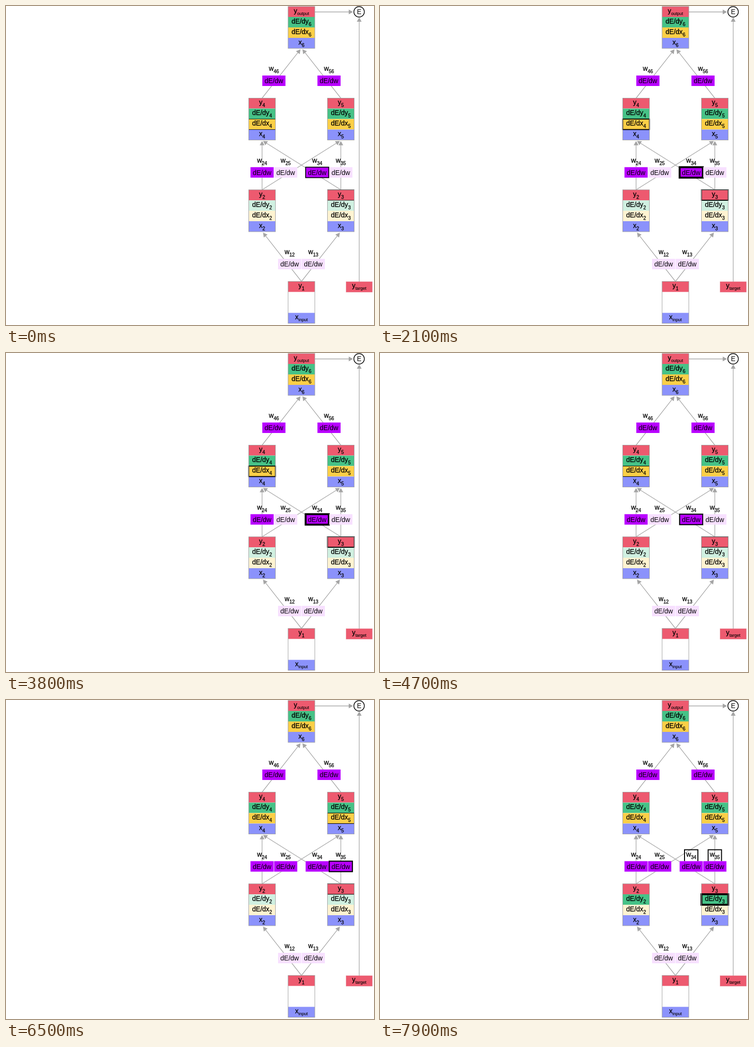
These frames come from a looping animation (771x670 px, 8 s). An HTML page:

```html
<!DOCTYPE html>
<html lang="en">
<head>
<meta charset="utf-8">
<title>Backpropagation</title>
<style>
  html, body { margin: 0; width: 100%; height: 100%; overflow: hidden; background: #fff; }
  svg { display: block; }
  text { font: 14px "Liberation Sans", Arial, sans-serif; text-anchor: middle; fill: #000; }
  .bold { stroke: #000; stroke-width: .3px; }
  .digit { font-size: 10px; }
  .word { font-size: 9px; stroke-width: .1px; }
  .edge { stroke: #a5a5a5; stroke-width: 1.3; }
  .head { fill: #a5a5a5; }
  .frame { fill: none; stroke: #a0a0a0; }
  .mark { fill: none; stroke: #000; stroke-width: 0; }
</style>
</head>
<body>
<svg id="stage" width="771" height="670" viewBox="0 0 771 670"></svg>
<script>
const LOOP = 8000, STEP = 100, RAMP = 180, FILL = 300;
const ROW = 22, NODE_W = 56, WEIGHT_W = 48.5;
const RED = '#ed5a6f', PURPLE = '#b800ff';
const ROWS = [
  { key: 'y', text: 'y', fill: RED, size: 2 },
  { key: 'dy', text: 'dE/dy', fill: '#46c287', size: 4 },
  { key: 'dx', text: 'dE/dx', fill: '#fbcf47', size: 2 },
  { key: 'x', text: 'x', fill: '#8b92fb', size: 2 }
];
const EDGES = ['12', '13', '24', '25', '34', '35', '46', '56'];
const KNOWN = ['24', '34', '46', '56'];

// Each phase outlines its parts in equal beats and fills one of them in
const phases = [
  { from: -80, to: 4800, beats: 6, parts: 'dx4 dw34 y3' },
  { from: 4880, to: 5690, beats: 1, parts: 'y2 dw25', fills: 'dw25' },
  { from: 4880, to: 6600, beats: 1, parts: 'dx5' },
  { from: 5800, to: 6600, beats: 1, parts: 'y3 dw35', fills: 'dw35' },
  { from: 6600, to: 7620, beats: 2, parts: 'dy2 w24 w25 dx4 dx5', fills: 'dy2' },
  { from: 7500, to: 8080, beats: 1, parts: 'dy3 w34 w35', fills: 'dy3' }
];

const stage = document.getElementById('stage');
const marks = [], fades = [];
const clamp = v => Math.max(0, Math.min(1, v));

function add(tag, attrs, parent = stage) {
  const el = document.createElementNS('http://www.w3.org/2000/svg', tag);
  for (const key in attrs) el.setAttribute(key, attrs[key]);
  parent.appendChild(el);
  return el;
}

function rect(x, y, width, height, attrs) {
  return add('rect', { x, y, width, height, ...attrs });
}

function label(x, y, main, sub = '') {
  const el = add('text', { x, y, class: sub ? 'bold' : '' });
  el.append(main);
  if (!sub) return;
  const word = sub.length > 2;
  add('tspan', { dy: word ? 4 : 5, class: word ? 'word' : 'digit' }, el).textContent = sub;
}

function arrow(x1, y1, x2, y2) {
  const angle = Math.atan2(y2 - y1, x2 - x1);
  add('line', { x1, y1, x2: x2 - 6 * Math.cos(angle), y2: y2 - 6 * Math.sin(angle), class: 'edge' });
  add('path', {
    d: 'M0 0L-9 -5V5Z', class: 'head',
    transform: `translate(${x2} ${y2}) rotate(${angle * 180 / Math.PI})`
  });
}

function mark(part, size, x, y, w, h) {
  const active = phases.filter(p => p.parts.split(' ').includes(part));
  if (active.length) marks.push({ el: rect(x, y, w, h, { class: 'mark' }), active, size });
}

function box(part, x, y, w, h, fill, pale) {
  rect(x, y, w, h, { fill: '#fff' });
  const el = rect(x, y, w, h, { fill, 'fill-opacity': pale });
  const phase = phases.find(p => p.fills === part);
  if (phase) fades.push({ el, pale, from: phase.from });
}

// Middle and top of a node: two columns around a centre, four layers
function place(id) {
  const layer = Math.floor(id / 2);
  const side = id === 1 || id === 6 ? 0 : id % 2 ? 1 : -1;
  return { x: 619 + side * 82.5, y: 578.5 - layer * 192.5 };
}

function node(id) {
  const { x, y } = place(id), left = x - NODE_W / 2;
  const rows = ROWS.map((row, i) => ({ ...row, top: y + i * ROW, part: row.key + id }))
    .filter(row => id > 1 || row.text.length === 1);
  for (const row of rows) {
    const pale = id < 4 && row.key.startsWith('d') ? .25 : 1;
    box(row.part, left, row.top, NODE_W, ROW, row.fill, pale);
  }
  for (const row of rows) mark(row.part, row.size, left, row.top, NODE_W, ROW);
  rect(left, y, NODE_W, ROW * 4, { class: 'frame' });
  const names = { y6: 'output', x1: 'input' };
  for (const row of rows) label(x, row.top + 13.5, row.text, names[row.part] || String(id));
}

function edge(id) {
  const a = place(+id[0]), b = place(+id[1]);
  arrow(a.x, a.y, b.x - 2 * Math.sign(b.x - a.x), b.y + ROW * 4 + 2);
}

function weight(id) {
  const a = place(+id[0]), b = place(+id[1]);
  const x = a.x + (b.x - a.x) * .3, y = a.y - 36.5;
  const area = [x - WEIGHT_W / 2, y - ROW / 2, WEIGHT_W, ROW];
  mark('w' + id, 2, x - 14, y - 35, 28, 26);
  label(x, y - 21, 'w', id);
  box('dw' + id, ...area, PURPLE, KNOWN.includes(id) ? 1 : .12);
  mark('dw' + id, 4, ...area);
  label(x, y + 5, 'dE/dw');
}

EDGES.forEach(edge);
arrow(647, 12.5, 727, 12.5);
arrow(740, 579, 740, 24);
for (let id = 1; id <= 6; id++) node(id);
rect(712.5, 579, 55, ROW, { fill: RED, stroke: '#e08a98', 'stroke-width': .6 });
label(740, 591.5, 'y', 'target');
add('circle', { cx: 739.8, cy: 12.2, r: 11, fill: '#fff', stroke: '#000', 'stroke-width': 1.4 });
label(739.8, 17, 'E');
EDGES.forEach(weight);

// Rises, holds and falls once per beat
function beat(phase, t) {
  if (t < phase.from || t > phase.to) return 0;
  const length = (phase.to - phase.from) / phase.beats;
  const at = (t - phase.from) % length;
  return clamp(Math.min(at, length - at) / RAMP);
}

function draw(t) {
  for (const m of marks) {
    m.el.style.strokeWidth = m.size * Math.max(...m.active.map(p => beat(p, t)));
  }
  for (const f of fades) {
    f.el.style.fillOpacity = f.pale + (1 - f.pale) * clamp((t - f.from) / FILL);
  }
}

const start = performance.now();
function tick() {
  const t = (performance.now() - start) % LOOP;
  draw(Math.floor(t / STEP) * STEP);
  requestAnimationFrame(tick);
}
tick();
</script>
</body>
</html>
```
